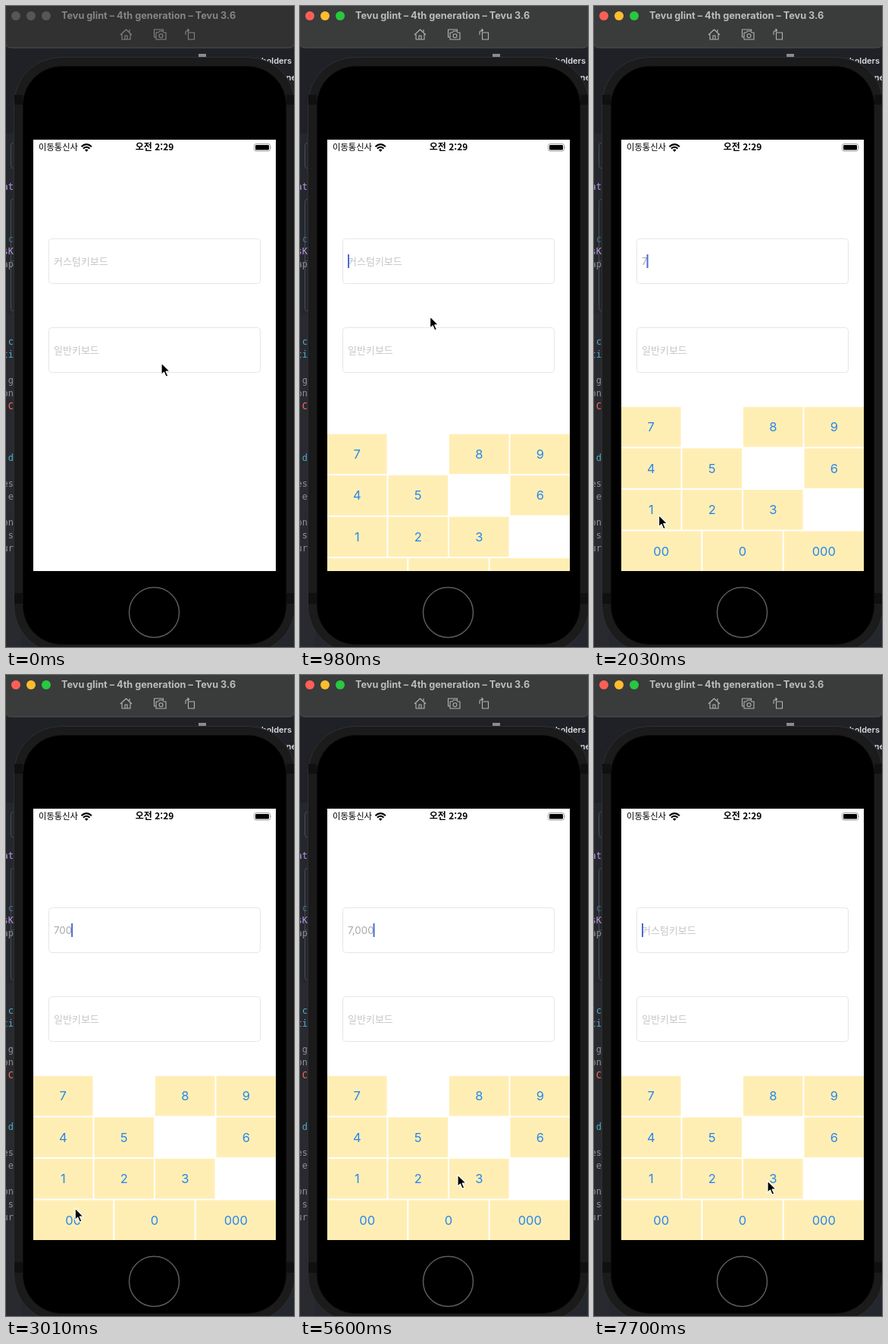
These frames come from a looping animation (380x844 px, 8 s). An HTML page:

```html
<!DOCTYPE html>
<html lang="ko">
<head>
<meta charset="utf-8">
<style>
  html, body { margin: 0; height: 100%; overflow: hidden; background: #25272e; }
  svg { display: block; }
  text { font-family: Inter, "Noto Sans CJK KR", "Noto Sans CJK", sans-serif; }
  .ko { font-family: "Noto Sans CJK KR", "Noto Sans CJK", sans-serif; }
  #code text { font: 12px "DejaVu Sans Mono", monospace; text-anchor: end; }
  #keys rect { fill: #ffeeb4; }
  #keys text { font-size: 16.5px; fill: #2787ee; text-anchor: middle; }
  #header { --bar: #303130; --title: #858585; --icon: #858585; --red: #565656; --amber: #565656; --green: #565656; }
  #header.active { --bar: #3a3b3b; --title: #bcbcbc; --icon: #b4b4b4; --red: #ff5f57; --amber: #febc2e; --green: #28c840; }
  .hint { font-size: 13px; fill: #c6c6c8; }
</style>
</head>
<body>
<svg width="380" height="844" viewBox="0 0 380 844">
  <defs><clipPath id="screen"><path d="M36 176h320v568H36z"/></clipPath></defs>

  <!-- editor behind the device -->
  <path fill="#25272e" d="M0 0h380v844H0z"/>
  <path fill="#1f2127" d="M0 56h380v112H0z"/>
  <path fill="#292a30" d="M0 405h20v439H0z"/>
  <g fill="none" stroke="#4b4d54">
    <rect x="6.5" y="180.5" width="20" height="33" rx="3"/>
    <rect x="6.5" y="254.5" width="20" height="147" rx="3"/>
    <path d="M6 335.500h9"/>
  </g>
  <g id="code"></g>
  <path fill="#8b8b8d" d="M254 63h10v5h-10z"/>
  <g font-size="11" font-weight="600" fill="#dcdcde" text-anchor="end">
    <text x="377" y="76">holders</text><text x="383" y="98">ne</text>
  </g>

  <g id="header">
    <path fill="var(--bar)" stroke="#4d4e4e" d="M-.5-1h381v48q0 8-8 8H7.500q-8 0-8-8z"/>
    <circle cx="13" cy="13" r="6" fill="var(--red)"/>
    <circle cx="33" cy="13" r="6" fill="var(--amber)"/>
    <circle cx="53" cy="13" r="6" fill="var(--green)"/>
    <text x="73" y="17" font-size="12.7" font-weight="700" fill="var(--title)">Tevu glint – 4th generation – Tevu 3.6</text>
    <g fill="none" stroke="var(--icon)" stroke-width="1.1" stroke-linejoin="round">
      <path d="M151 38l7.500-7 7.500 7M153 37v7h11v-7M157 44v-5h3v5M163 34v-3"/>
      <path d="M197.500 41h-2v-10h12v2M198 35h3l1.500-2h4l1.500 2h3v9h-13z"/>
      <circle cx="204.500" cy="39.300" r="2.500"/>
      <path d="M240.500 35h8v9h-8zM237 38v-3q0-3 4-3M239.500 30l2 2-2 2"/>
    </g>
  </g>

  <!-- device -->
  <rect x="10.500" y="67.500" width="371" height="784" rx="62" fill="#1b1b1c" stroke="#303031"/>
  <path fill="#101011" d="M11 117h11v13H11zM11 773h11v14H11zM370 117h11v13h-11zM370 773h11v14h-11z"/>
  <rect x="22.500" y="79.500" width="347" height="761" rx="51" stroke="#0a0a0a"/>
  <circle cx="195.500" cy="798.500" r="33" fill="none" stroke="#5c5c5c" stroke-width="1.500"/>
  <path fill="#fff" d="M36 176h320v568H36z"/>

  <!-- status bar -->
  <text class="ko" x="43" y="190" font-size="11.300">이동통신사</text>
  <text class="ko" x="196" y="190.300" font-size="12" font-weight="700" text-anchor="middle">오전 2:29</text>
  <g fill="none" stroke="#000" stroke-width="2.100">
    <path d="M99.500 185.300q6.700-6.200 13.400 0M101.900 187.700q4.300-3.900 8.600 0"/>
    <path fill="#000" stroke="none" d="M106.200 192l-2.300-2.500q2.300-1.900 4.600 0z"/>
  </g>
  <rect x="327.500" y="181.500" width="21" height="9.500" rx="2.500" fill="none" stroke="#a0a0a0"/>
  <rect x="329" y="183" width="18" height="6.500" rx="1.300"/>
  <path fill="#a0a0a0" d="M349.500 184.500q1.500 1.800 0 3.500z"/>

  <!-- fields -->
  <g fill="none" stroke="#e6e6e6">
    <rect x="56.500" y="306.500" width="279" height="59" rx="4"/>
    <rect x="56.500" y="423.500" width="279" height="59" rx="4"/>
  </g>
  <text id="hint" class="ko hint" x="63" y="341">커스텀키보드</text>
  <text class="ko hint" x="63" y="458">일반키보드</text>
  <text id="value" x="63" y="341" font-size="13.300" fill="#a8a8a8"></text>
  <rect id="caret" y="327" width="2" height="18" fill="#4a6cd6"/>

  <g clip-path="url(#screen)"><g id="keys"></g></g>
  <path id="pointer" d="M0 0v15.500l3.500-3.300 2.600 6 2.700-1.100-2.600-5.900h5z" stroke="#fff" stroke-width="1.200" stroke-linejoin="round"/>
</svg>

<script>
const $ = id => document.getElementById(id);
const clamp = v => Math.max(0, Math.min(1, v));
const LOOP = 8000, OPEN = 770;

const codeLines = [
  ['at', 242, '#b59be0'], ['c', 311, '#41788a'], ['sK', 327, '#b59be0'], ['ap', 344, '#8d8f94'],
  ['c', 446, '#4bb0cc'], ['ti', 463, '#4bb0cc'], ['g', 497, '#8d8f94'], ['on', 514, '#8d8f94'],
  ['C', 531, '#fc6a5d'], ['d', 599, '#4bb0cc'], ['es', 633, '#8d8f94'], ['e', 650, '#8d8f94'],
  ['on', 684, '#8d8f94'], ['s', 701, '#8d8f94'], ['ur', 718, '#8d8f94']
];
$('code').innerHTML = codeLines.map(([s, y, color]) =>
  `<text x="10" y="${y}" fill="${color}">${s}</text>`).join('');

// Empty labels leave blank cells
const rows = [['7', '', '8', '9'], ['4', '5', '', '6'], ['1', '2', '3', ''], ['00', '0', '000']];
$('keys').innerHTML = rows.map((row, r) => {
  const w = (322 - 2 * row.length) / row.length, y = 528 + r * 54.5;
  return row.map((label, c) => {
    const x = 36 + c * (w + 2);
    return label && `<rect x="${x}" y="${y}" width="${w}" height="52.5"/>
      <text x="${x + w / 2}" y="${y + 32}" data-key="${label}">${label}</text>`;
  }).join('');
}).join('');
const labels = [...document.querySelectorAll('[data-key]')];

// [time, x, y]
const moves = [
  [0, 205, 470], [420, 200, 352], [770, 200, 352], [1330, 111, 530], [1600, 84, 556], [1720, 84, 556],
  [2170, 86, 704], [2700, 86, 704], [2800, 91, 702], [3000, 91, 702], [3500, 225, 712],
  [3780, 205, 712], [3850, 206.5, 712], [4330, 206.5, 712], [4550, 275, 713], [4800, 275, 713],
  [5600, 208, 658], [5640, 208, 658], [5950, 229, 665], [6100, 229, 665], [6160, 229, 666], [LOOP, 229, 666]
];
// [time, text]; every entry also restarts the caret blink
const edits = [
  [OPEN, ''], [1680, '7'], [2450, '700'], [4200, '7,000'], [7070, '7,00'],
  [7210, '7,0'], [7350, '7,'], [7560, '7'], [7700, '']
];
// [label, down, up]
const presses = [['7', 1610, 1750], ['00', 2380, 2520], ['0', 4130, 4200]];

function pointerAt(t) {
  const i = moves.findIndex(m => m[0] > t);
  const [t0, x0, y0] = moves[i - 1], [t1, x1, y1] = moves[i];
  const p = (t - t0) / (t1 - t0), e = p * p * (3 - 2 * p);
  return [x0 + (x1 - x0) * e, y0 + (y1 - y0) * e];
}

function caretOpacity(age) {
  if (age < 620) return 1;
  const phase = (age - 620) % 1050;
  return phase < 320 ? 1 - clamp(phase / 90) : clamp((phase - 320) / 100);
}

function draw(t) {
  $('header').classList.toggle('active', t >= 560);
  $('pointer').setAttribute('transform', `translate(${pointerAt(t)})`);

  const edit = edits.filter(e => e[0] <= t).pop();
  const text = edit ? edit[1] : '';
  $('value').textContent = text;
  $('hint').style.display = text ? 'none' : '';
  $('caret').setAttribute('x', 63 + (text ? $('value').getComputedTextLength() - 1 : 0));
  $('caret').style.opacity = edit ? caretOpacity(t - edit[0]) : 0;

  const s = Math.max(0, t - OPEN + 21) * 0.014;
  $('keys').setAttribute('transform', `translate(0 ${216 * (1 + s) * Math.exp(-s)})`);
  for (const el of labels) {
    const down = presses.some(([key, from, to]) => key === el.dataset.key && t >= from && t < to);
    el.style.opacity = down ? 0.3 : 1;
  }
}

const start = performance.now();
function tick() {
  draw((performance.now() - start) % LOOP);
  requestAnimationFrame(tick);
}
tick();
</script>
</body>
</html>
```
